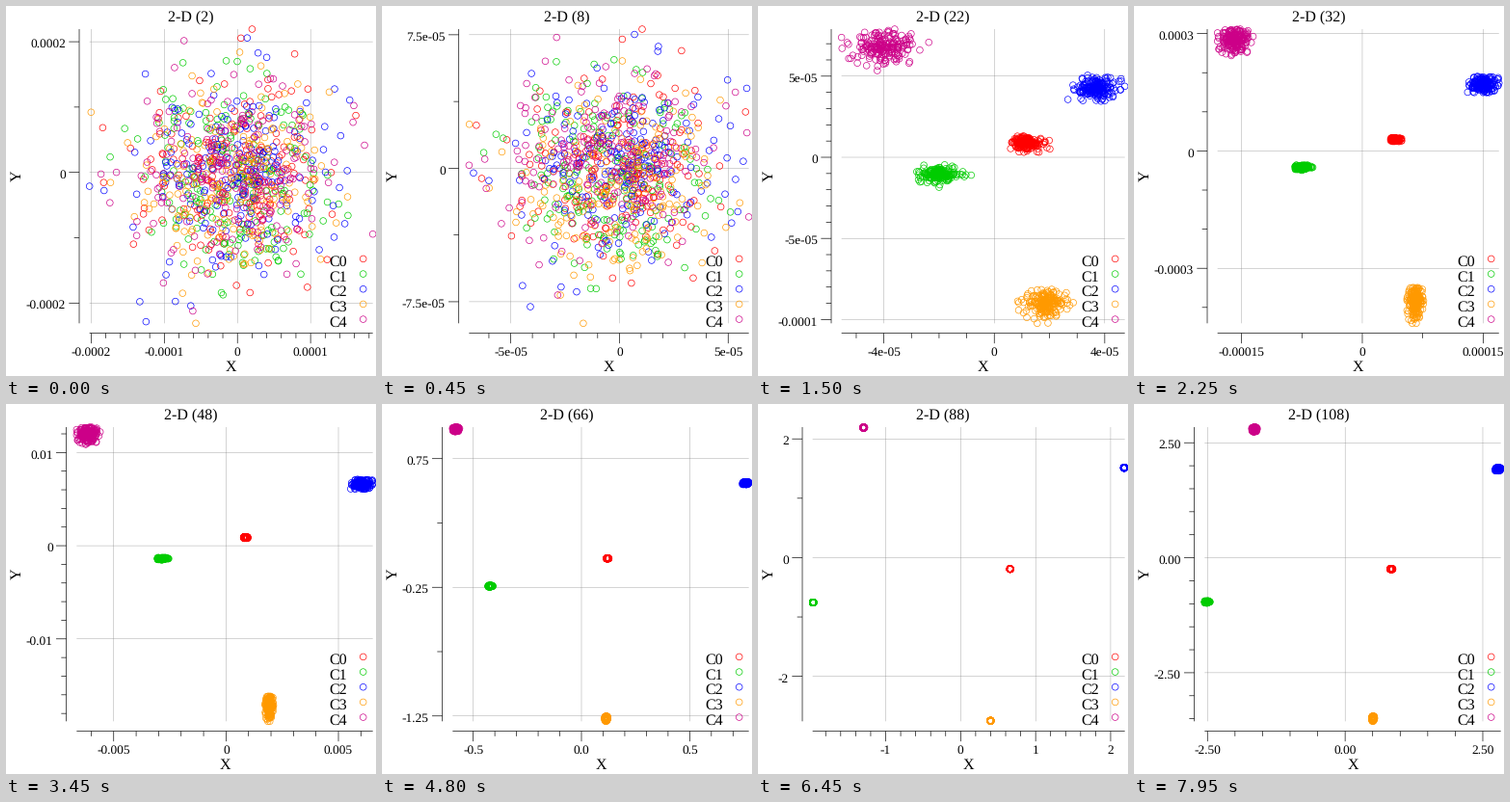
A matplotlib script that plays this animation: 384x384 px, repeating every 8000 ms.

```python
import math

import matplotlib.pyplot as plt
import numpy as np
from matplotlib.animation import FuncAnimation
from matplotlib.collections import LineCollection

SIZE = 384
TOP, BOTTOM, AXIS_Y = 24.0, 329.3, 339.5
COLORS = ["#ff0000", "#00cc00", "#0000ff", "#ff9900", "#cc0088"]
PER_CLASS = 200
STEPS = 54
EM = 40 / 3  # tick label size in pixels
TICK = 32 / 3

# Cluster centres relative to the overall scale, drifting between four layouts.
LAYOUT_KNOTS = [14, 48, 66, 88]
LAYOUTS = np.array([
    [(0.17, 0.10), (-0.21, -0.14), (0.42, 0.49), (0.23, -1), (-0.455, 0.735)],
    [(0.05, 0.05), (-0.16, -0.08), (0.345, 0.377), (0.11, -1), (-0.35, 0.674)],
    [(0.095, -0.02), (-0.33, -0.19), (0.596, 0.44), (0.09, -1), (-0.455, 0.768)],
    [(0.24, -0.07), (-0.715, -0.275), (0.793, 0.55), (0.145, -1), (-0.47, 0.796)],
])
# Overall scale: slow start, exponential growth, saturation.
SCALE_KNOTS = [2, 14, 32, 48, 66, 74, 88, 108]
LOG_SCALES = np.log([2e-6, 2.86e-5, 3.95e-4, 1.75e-2, 1.272, 2.2, 2.75, 3.5])
# Spread of a cluster: a fixed part and a part growing with its distance.
SPREAD_KNOTS = [14, 32, 48, 66, 88, 108]
LOG_FIXED = np.log([1, 0.01, 0.003, 0.006, 0.003, 0.007])
LOG_RELATIVE = np.log([0.02, 0.11, 0.075, 0.012, 0.001, 0.012])
LOOSENESS = np.array([0.65, 0.9, 0.865, 0.92, 1.4])[:, None] * (0.85, 0.6)


def unit(values, axis):
    """Rescale to the range -1..1 along the axis."""
    low, high = values.min(axis, keepdims=True), values.max(axis, keepdims=True)
    return 2 * (values - low) / (high - low) - 1


rng = np.random.default_rng(11)
normal = np.clip(rng.normal(size=(5, PER_CLASS, 2)), -3.1, 3.1)
start_low, start_high = np.array([(-2.036, -2.294), (1.868, 2.191)]) * 1e-4
cloud = start_low + (unit(normal, (0, 1)) + 1) / 2 * (start_high - start_low)
normal = rng.normal(size=(5, PER_CLASS, 2))
jitter = unit(np.sign(normal) * np.abs(normal) ** 1.2, 1)
packed = np.sin(jitter * math.pi / 2)


def track(n, knots, values):
    i = int(np.clip(np.searchsorted(knots, n, "right") - 1, 0, len(knots) - 2))
    u = np.clip((n - knots[i]) / (knots[i + 1] - knots[i]), 0, 1)
    return values[i] * (1 - u) + values[i + 1] * u


def positions(n):
    """Data coordinates of all points at counter n."""
    center = track(n, LAYOUT_KNOTS, LAYOUTS)
    scale = np.exp(track(n, SCALE_KNOTS, LOG_SCALES))
    spread = (LOOSENESS * np.exp(track(n, SPREAD_KNOTS, LOG_FIXED))
              + np.abs(center) * np.exp(track(n, SPREAD_KNOTS, LOG_RELATIVE)))
    shape = track(n, [14, 32], [jitter, packed])
    points = scale * (center[:, None] + spread[:, None] * shape)
    fade = max(0, 1 - (n - 2) / 12) ** 1.5
    return (points + fade * cloud).reshape(-1, 2)


def label_steps(lo, hi, want=3):
    """Talbot-Lin-Hanrahan labels within [lo, hi]."""
    qs = [1, 5, 2, 2.5, 4, 3]
    span = hi - lo
    best_score, best = -2, None

    def score(simple, cover, dense):
        return 0.25 * simple + 0.2 * cover + 0.5 * dense + 0.05

    for skip in range(1, 60):
        for rank, q in enumerate(qs):
            base = 1 - rank / (len(qs) - 1) - skip
            if score(base + 1, 1, 1) < best_score:
                return best
            for have in range(2, 60):
                dense_max = 1 if have < want else 2 - (have - 1) / (want - 1)
                if score(base + 1, 1, dense_max) < best_score:
                    break
                mag = math.ceil(math.log10(span / (have + 1) / skip / q))
                while mag < 300:
                    step = skip * q * 10.0 ** mag
                    width = step * (have - 1)
                    over = max(0, (width - span) / 2)
                    cover_max = 1 - (over / (0.1 * span)) ** 2
                    if score(base + 1, cover_max, dense_max) < best_score:
                        break
                    first = (math.floor(hi / step) - have + 1) * skip
                    for start in range(first, math.ceil(hi / step) * skip + 1):
                        a = start * step / skip
                        b = a + width
                        if a < lo or b > hi:
                            continue
                        rest = math.fmod(a, step)
                        aligned = rest < 2e-14 or step - rest < 2e-14
                        simple = base + (aligned and a <= 0 <= b)
                        cover = 1 - 0.5 * ((hi - b) ** 2 + (lo - a) ** 2) / (0.1 * span) ** 2
                        ratio = (have - 1) / width * span / (want - 1)
                        s = score(simple, cover, 2 - max(ratio, 1 / ratio))
                        if s > best_score:
                            best_score, best = s, (have, a, skip * q, q, mag)
                    mag += 1
    return best


def make_ticks(lo, hi):
    """Major ticks as (value, label) and minor tick values."""
    count, first, step, q, mag = label_steps(lo, hi)
    delta = step * 10.0 ** mag
    general = mag < -1 or mag > 6
    prec = min(6, max(general + 2 * (q != int(q)), -mag))
    kind = "g" if general else "f"
    values = [first + i * delta for i in range(count)]
    values = [0.0 if abs(v) < delta * 1e-9 else v for v in values]
    major = [(v, f"{v:.{prec}{kind}}") for v in values]
    parts = 5 if step in (1, 2.5) else int(step) if step in (2, 3, 4, 5) else 2
    small = delta / parts
    grid = first + small * np.arange(math.ceil((lo - first) / small),
                                     math.floor((hi - first) / small) + 1)
    minor = [v for v in grid if min(abs(v - m) for m in values) > small / 2]
    return major, minor


def text_width(label):
    return EM * sum({".": 0.25, "-": 0.333, "e": 0.444}.get(c, 0.5) for c in label)


def layout(n):
    """Everything that is drawn at counter n, in pixels."""
    points = positions(n)
    (x0, y0), (x1, y1) = points.min(axis=0), points.max(axis=0)
    xmajor, xminor = make_ticks(x0, x1)
    ymajor, yminor = make_ticks(y0, y1)

    # The plot area shrinks so that the outermost tick labels fit.
    axis_x = 34.9 + max(text_width(s) for _, s in ymajor)
    left = axis_x + TICK
    right, top = SIZE - 10 / 3, TOP
    for v, s in xmajor:
        f = (v - x0) / (x1 - x0)
        if f > 0.5:
            right = min(right, left + (SIZE - text_width(s) / 2 - left) / f)
    for v, _ in ymajor:
        f = (v - y0) / (y1 - y0)
        if f > 0.5:
            top = max(top, (27.7 - (1 - f) * BOTTOM) / f)

    def px(v):
        return left + (v - x0) / (x1 - x0) * (right - left)

    def py(v):
        return BOTTOM - (v - y0) / (y1 - y0) * (BOTTOM - top)

    grid, lines = [], [[(left, AXIS_Y), (right, AXIS_Y)],
                       [(axis_x, top), (axis_x, BOTTOM)]]
    mid_x, mid_y = (left + right) / 2, (top + BOTTOM) / 2
    texts = [(SIZE / 2, 15.3, f"2-D ({n})", 12, "center", 0),
             (mid_x, 379, "X", 12, "center", 0),
             (16, mid_y, "Y", 12, "center", 90)]
    for v, s in xmajor:
        x = px(v)
        grid.append([(x, top), (x, BOTTOM)])
        lines.append([(x, AXIS_Y), (x, AXIS_Y + TICK)])
        texts.append((x, 363, s, 10, "center", 0))
    for v, s in ymajor:
        y = py(v)
        grid.append([(left, y), (right, y)])
        lines.append([(axis_x - TICK, y), (axis_x, y)])
        texts.append((axis_x - 14, y + 6, s, 10, "right", 0))
    lines += [[(px(v), AXIS_Y), (px(v), AXIS_Y + TICK / 2)] for v in xminor]
    lines += [[(axis_x - TICK / 2, py(v)), (axis_x, py(v))] for v in yminor]
    dots = np.column_stack([px(points[:, 0]), py(points[:, 1])])
    return grid, lines, texts, dots


SCENES = [layout(2 + 2 * i) for i in range(STEPS)]

plt.rcParams["font.family"] = "Liberation Serif"
plt.rcParams["text.hinting"] = "no_hinting"
fig = plt.figure(figsize=(4, 4), dpi=96, facecolor="white")
ax = fig.add_axes([0, 0, 1, 1])
ax.axis("off")

grid_art = LineCollection([], colors="#808080", linewidths=0.25, snap=False, zorder=1)
axis_art = LineCollection([], colors="black", linewidths=0.5, snap=False, zorder=2)
ax.add_collection(grid_art, autolim=False)
ax.add_collection(axis_art, autolim=False)

legend_dots = [(370.7, 262.4 + 15.67 * i) for i in range(5)]
ring_colors = [c for c in COLORS for _ in range(PER_CLASS)] + COLORS
rings = ax.scatter(np.zeros(len(ring_colors)), np.zeros(len(ring_colors)), s=25,
                   facecolors="none", edgecolors=ring_colors, linewidths=0.5,
                   zorder=3, clip_on=False)
for i in range(5):
    ax.text(353.7, 270 + 15.67 * i, f"C{i}", size=12, ha="right", va="baseline", zorder=4)
ax.set_xlim(0, SIZE)
ax.set_ylim(SIZE, 0)

labels = []


def update(frame):
    grid, lines, texts, dots = SCENES[min(frame // 3, STEPS - 1)]
    grid_art.set_segments(grid)
    axis_art.set_segments(lines)
    rings.set_offsets(np.vstack([dots, legend_dots]))
    while labels:
        labels.pop().remove()
    for x, y, s, size, ha, angle in texts:
        labels.append(ax.text(x, y, s, size=size, ha=ha, va="baseline",
                              rotation=angle, rotation_mode="anchor", zorder=4))
    return []


anim = FuncAnimation(fig, update, frames=160, interval=50, repeat=True,
                     repeat_delay=0, blit=False, init_func=lambda: [])
plt.show()
```
